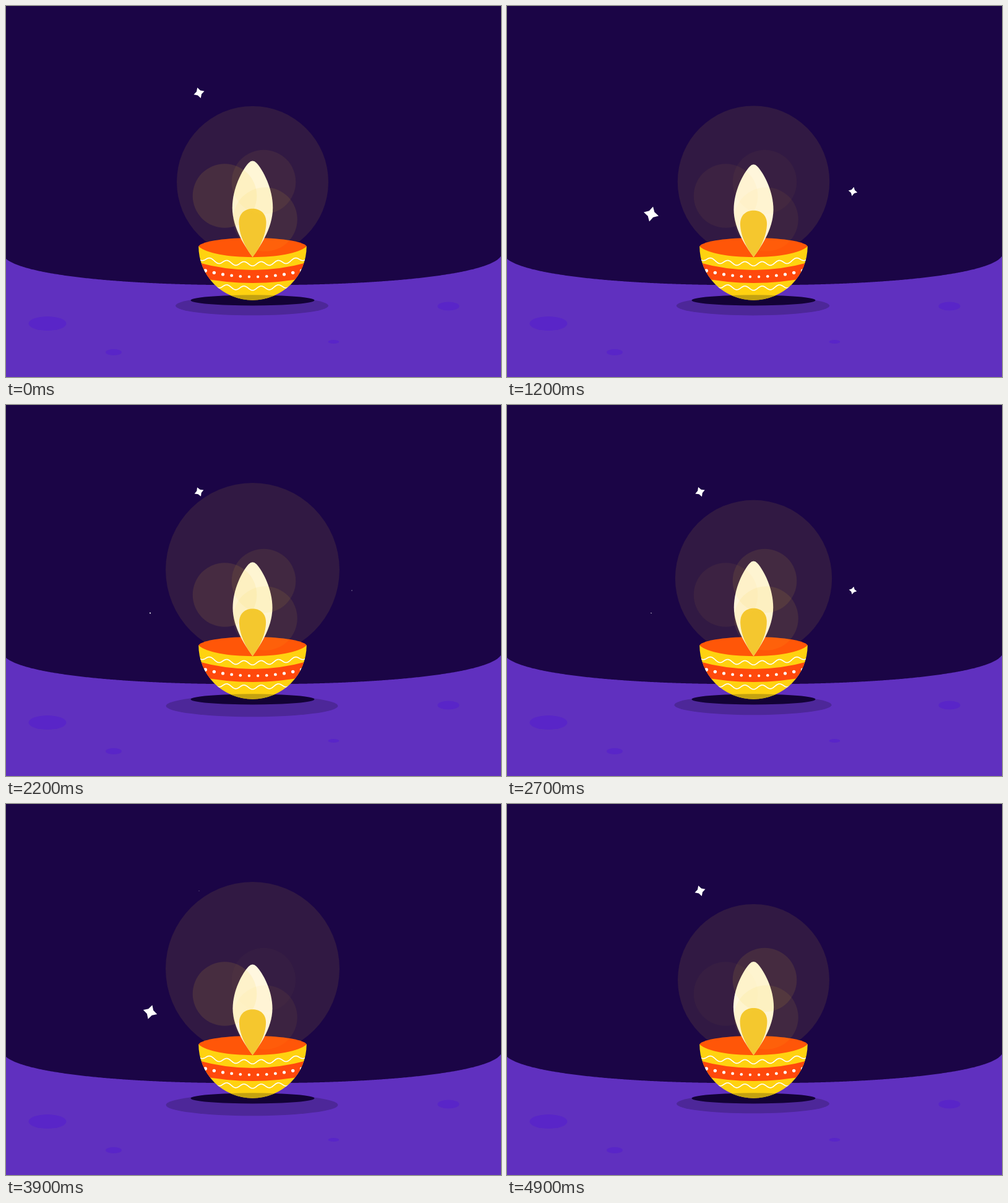
Animation of 800 by 600 pixels, one loop 5 s. Source, as an HTML page with a canvas:

```html
<!DOCTYPE html>
<html>
<head>
<meta charset="utf-8">
<title>Oil lamp</title>
<style>
html, body { margin: 0; width: 100%; height: 100%; overflow: hidden; background: #1b0546; }
canvas { display: block; }
</style>
</head>
<body>
<canvas id="stage" width="800" height="600"></canvas>
<script>
const g = document.getElementById('stage').getContext('2d');
const LOOP = 5000, STEP = 100, CX = 398.5, TAU = 2 * Math.PI;

// Wave from 0 to 1 that peaks at the given time.
const pulse = (t, period, peak = 0) => .5 + .5 * Math.cos(TAU * (t - peak) / period);

// Eased swing between 0 and 1 that turns round at the given times, low first.
function swing(turns, t) {
  let i = 0;
  while (i < turns.length - 2 && t >= turns[i + 1]) i++;
  const p = Math.min(1, (t - turns[i]) / (turns[i + 1] - turns[i]));
  const s = .5 - .5 * Math.cos(Math.PI * p);
  return i % 2 ? 1 - s : s;
}

const glowTurns = [0, 670, 1245, 2230, 2920, 3900, 4900];
const rightTurns = [-500, 400, 1550, 2500, 3900, 4900];

const bowl = new Path2D('M311.2 388.5A87.3 87.3 0 0 0 485.8 388.5Z');
const mouth = new Path2D('M311.2 388.5C325 370.5 472 370.5 485.8 388.5C462 412 335 412 311.2 388.5Z');
const band = new Path2D('M311 415Q398.5 439 486 415V439Q398.5 457 311 439Z');
const flame = new Path2D('M0 0C-10 -14 -32.7 -46 -32.7 -80C-32.7 -111 -17 -141 -6.5 -152.5Q0 -159.5 6.5 -152.5C17 -141 32.7 -111 32.7 -80C32.7 -46 10 -14 0 0Z');
const core = new Path2D('M0 0C-11 -14 -22 -36 -22 -56C-22 -71 -12 -78.5 0 -78.5C12 -78.5 22 -71 22 -56C22 -36 11 -14 0 0Z');

function ellipse(x, y, rx, ry, fill) {
  g.fillStyle = fill;
  g.beginPath();
  g.ellipse(x, y, rx, ry, 0, 0, TAU);
  g.fill();
}

function fill(path, color) {
  g.fillStyle = color;
  g.fill(path);
}

function ground() {
  g.fillStyle = '#6030bf';
  g.fillRect(0, 0, 800, 600);
  // The sky ends below in a slightly squared ellipse.
  g.beginPath();
  g.moveTo(0, 0);
  for (let x = 0; x <= 800; x += 2)
    g.lineTo(x, 397.5 + 54 * (1 - Math.abs((x - 398) / 404) ** 2.2) ** (1 / 2.2));
  g.lineTo(800, 0);
  g.fillStyle = '#1b0546';
  g.fill();
  ellipse(67, 513.5, 30.5, 11.5, '#5925c8');
  ellipse(174, 560, 13, 5, '#5925c8');
  ellipse(529.5, 543, 9, 3, '#5925c8');
  ellipse(715, 485.5, 17.5, 7, '#5925c8');
}

function wave(mid) {
  g.beginPath();
  for (let x = 311; x <= 486; x++) {
    const d = x - CX;
    g.lineTo(x, mid - d * d / 780 + 3.3 * Math.cos(d * TAU / 27.5));
  }
  g.strokeStyle = '#fff';
  g.lineWidth = 1.6;
  g.stroke();
}

function lamp() {
  fill(bowl, '#ffd210');
  g.save();
  g.clip(bowl);
  fill(band, '#ff490c');
  for (let d = -77.8; d < 78; d += 14.15) {
    const r = 2.1 + Math.abs(d) / 110;
    ellipse(400 + d, 438 - d * d / 610, r, r, '#fff');
  }
  wave(417);
  wave(456.5);
  ellipse(CX, 476, 100, 8.7, '#c4a210');
  g.restore();
  fill(mouth, '#ff5608');
}

function fire(t) {
  const height = 153 - .0009 * t + 3 * Math.cos(TAU * (t - 250) / 2450);
  const width = 64.4 + 1.1 * Math.cos(TAU * t / 1700);
  g.save();
  g.translate(CX, 406);
  g.scale(width / 65.4, height / 156);
  fill(flame, '#fff8e2');
  fill(core, '#f4c72f');
  g.restore();
}

function halo(x, y, alpha) {
  ellipse(x, y, 51.8, 51.8, `rgba(244,200,46,${alpha})`);
}

// A star turns by four degrees, in the direction of spin, for each pixel it shrinks.
function star(x, y, full, size, tilt, spin) {
  const s = full * size;
  g.save();
  g.translate(x, y);
  g.rotate((tilt + spin * 4 * (full - s)) * TAU / 360);
  g.beginPath();
  for (let i = 0; i < 8; i++) {
    const r = i % 2 ? s * .5 : s, a = i * TAU / 8;
    g.lineTo(r * Math.cos(a), r * Math.sin(a));
  }
  g.fillStyle = '#fff';
  g.fill();
  g.restore();
}

function draw(t) {
  const r = 122.5 + 18 * swing(glowTurns, t);
  const rx = 123.5 + (r - 122.5) * .86, ry = rx * .126;
  ground();
  ellipse(397.5, 469.2 + ry, rx, ry, '#4d2799');
  ellipse(CX, 476, 100, 8.5, '#130236');
  ellipse(CX, 407 - r, r, r, 'rgba(244,200,46,.1)');
  lamp();
  fire(t);

  halo(353.5, 307, .025 + .09 * pulse(t, 1950) ** .6);
  halo(416.5, 284.5, .02 + .08 * swing(rightTurns, t));
  halo(419, 345, .055 + .04 * pulse(t, 2700));

  star(312, 140.5, 9, pulse(t, 2475), -18, -1);
  star(233, 336.5, 12.4, pulse(t, 2475, 1237), 14, 1);
  if (t < 4000) star(559, 300, 8.2, pulse(t, 2000, 1000), 12, 0);
}

function tick(now) {
  draw(Math.floor(now % LOOP / STEP) * STEP);
  requestAnimationFrame(tick);
}
draw(0);
requestAnimationFrame(tick);
</script>
</body>
</html>
```
